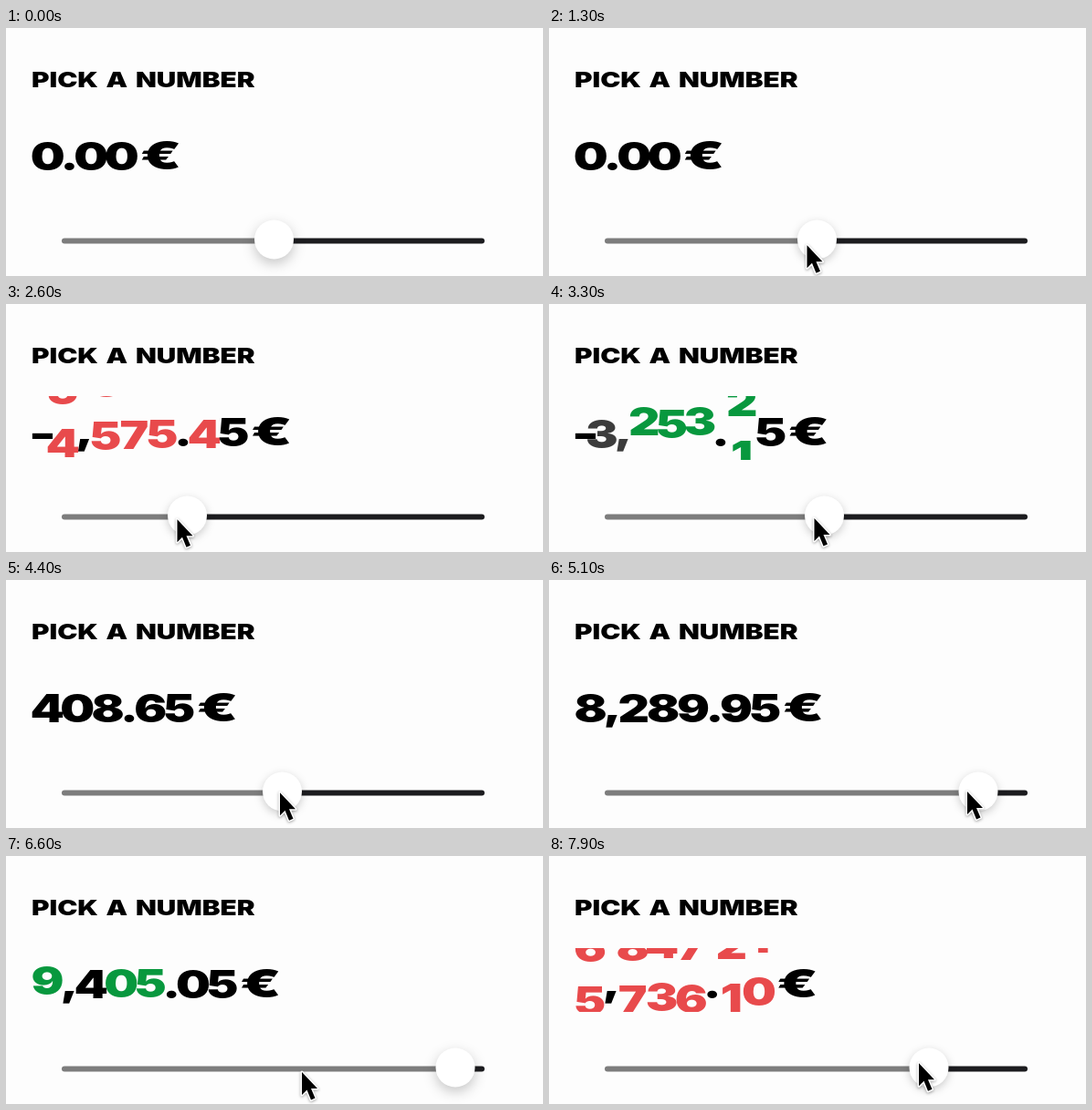
These frames come from a looping animation (588 px wide and 272 px high, 8000 ms). An HTML page:

```html
<!DOCTYPE html>
<html lang="en">
<head>
<meta charset="utf-8">
<title>Pick a number</title>
<style>
  html, body { margin: 0; width: 100%; height: 100%; overflow: hidden; background: #fdfdfd; }
  svg { display: block; width: 588px; height: 272px; }
  text { font: 900 42px Inter, "Open Sans", sans-serif; }
  .title { font-size: 23.4px; word-spacing: 2.2px; }
  #number text { text-anchor: middle; }
  .track { stroke-width: 6; stroke-linecap: round; }
  #cursor { filter: drop-shadow(0 1px 1.5px rgba(0,0,0,.35)); }
</style>
</head>
<body>
<svg viewBox="0 0 588 272">
  <clipPath id="window"><rect y="101" width="588" height="70"/></clipPath>
  <text class="title" transform="translate(28 65) scale(1.27 1)">PICK A NUMBER</text>
  <g id="number" clip-path="url(#window)"></g>
  <line id="rest" class="track" x2="521" y1="233.5" y2="233.5" stroke="#1c1c1f"/>
  <line id="fill" class="track" x1="64" y1="233.5" y2="233.5" stroke="#7d7d7d"/>
  <circle id="thumb" cy="232" r="21.5" fill="#fff"/>
  <path id="cursor" d="M1 2V27L6.5 21.5L11 32.5L15.5 30.5L11 20H18Z"
        stroke="#fff" stroke-width="3" stroke-linejoin="round" paint-order="stroke"/>
</svg>
<script>
const LOOP = 8000, STEP = 100, SPIN = 700;
const LEFT = 29, BASELINE = 155.5, ROW = 58, WIDE = 1.27, EXTRA_WIDE = 1.55;
const ADVANCE = [33.5, 23, 31.5, 32, 32.5, 31, 32.5, 30, 33, 33];
const RED = [232, 74, 76], GREEN = [8, 152, 62];

// start, value the wheels roll to
const readings = [
  [1300, -917.45], [1500, -2242.25], [2010, -4575.45], [3210, 408.65],
  [4400, 8289.95], [5350, 8490.05], [5950, 9405.05], [7400, 5736.10]
];

// start, end, thumb x, cursor x relative to the thumb
const drags = [
  [1300, 1900, 198.5, -12], [2900, 3300, 301.5, -12], [3800, 4200, 302.5, -3.5],
  [4400, 4800, 470, -13], [5300, 5700, 492, -12], [7400, 7900, 416, -12]
];

const $ = id => document.getElementById(id);
const clamp = v => Math.min(1, Math.max(0, v));
const mix = (a, b, k) => a + (b - a) * k;
const mixAll = (a, b, k) => a.map((v, i) => mix(v, b[i], k));
const wrap = d => ((d % 10) + 10) % 10;

function ease(t, from, to) {
  const k = clamp((t - from) / (to - from));
  return k * k * (3 - 2 * k);
}

const digitsOf = value => [...Math.abs(value * 100).toFixed(0).padStart(6, "0")].map(Number);
const isShown = (value, i) => i > 2 || Math.abs(value) >= 10 ** (3 - i);

// Distance a wheel rolls; short hops take one more full turn.
function turnOf(from, to, direction, changed) {
  const turn = wrap((to - from) * direction);
  return changed && turn < 2 ? turn + 10 : turn;
}

function spinWheel(wheel, i, before, after, u) {
  const was = digitsOf(before)[i], to = digitsOf(after)[i];
  const direction = after > Math.abs(before) ? 1 : -1;
  const left = (1 - u) ** (3 - 1 / (i + 1));
  const tinted = was !== to && isShown(before, i) && isShown(after, i);
  const strength = tinted ? clamp((1 - u) * 15) : 0;
  return {
    digit: wrap(to - direction * turnOf(wheel.digit, to, direction, was !== to) * left),
    shown: mix(+isShown(after, i), wheel.shown, left),
    advance: mix(ADVANCE[to], wheel.advance, 1 - u * u),
    colour: (after > before ? GREEN : RED).map(c => Math.round(c * strength))
  };
}

function poseAt(t) {
  let wheels = Array.from({ length: 6 }, (_, i) =>
    ({ digit: 0, shown: +isShown(0, i), advance: ADVANCE[0], colour: [0, 0, 0] }));
  let minus = 0, before = 0;
  readings.forEach(([start, after], n) => {
    if (t <= start) return;
    const end = n + 1 < readings.length ? readings[n + 1][0] : LOOP;
    const u = clamp((Math.min(t, end) - start) / SPIN);
    wheels = wheels.map((wheel, i) => spinWheel(wheel, i, before, after, u));
    minus = mix(+(after < 0), minus, (1 - u) ** 2);
    before = after;
  });
  return { wheels, minus };
}

function glyph(content = "") {
  const node = document.createElementNS("http://www.w3.org/2000/svg", "text");
  node.textContent = content;
  return $("number").appendChild(node);
}

function place(node, x, y, opacity = 1, wide = WIDE) {
  node.setAttribute("transform", `translate(${x.toFixed(2)} ${y.toFixed(2)}) scale(${wide} 1)`);
  node.setAttribute("opacity", opacity);
}

const sign = glyph("-"), comma = glyph(","), dot = glyph("."), euro = glyph("€");
const faces = Array.from({ length: 6 }, () => [glyph(), glyph()]);

function drawNumber(t) {
  const { wheels, minus } = poseAt(t);
  const room = shown => 1 - (1 - shown) ** 3;
  let x = LEFT + 17 * minus;
  place(sign, LEFT + 11, BASELINE + 1, clamp(minus * 2), EXTRA_WIDE);

  wheels.forEach(({ digit, shown, advance, colour }, i) => {
    const low = Math.floor(digit), part = digit - low;
    const width = advance * room(shown);
    faces[i].forEach((node, n) => {
      node.textContent = (low + n) % 10;
      node.setAttribute("fill", `rgb(${colour})`);
      place(node, x + width / 2, BASELINE + (part - n) * ROW, shown);
    });
    x += width;
    if (i === 0) {
      place(comma, x + 7.5, BASELINE - 3, shown);
      x += 15 * room(shown);
    }
    if (i === 3) {
      place(dot, x + 7, BASELINE);
      x += 14;
    }
  });
  place(euro, x + 26, BASELINE - 1, 1, EXTRA_WIDE);
}

function drawSlider(t) {
  const [x, grip] = drags.reduce(
    (at, [from, to, ...goal]) => mixAll(at, goal, ease(t, from, to)), [293.5, -12]);
  const away = ease(t, 6200, 6600) - ease(t, 7100, 7400);
  const below = 50 * (1 - ease(t, 800, 1100));
  const [cx, cy] = mixAll([x + grip, 238.5 - t / 600 + below], [323, 235], away);
  const held = t >= 1300 && away === 0;

  $("fill").setAttribute("x2", x);
  $("rest").setAttribute("x1", x);
  $("thumb").setAttribute("cx", x);
  $("thumb").style.filter = held
    ? "drop-shadow(0 3px 5px rgba(0,0,0,.2))"
    : "drop-shadow(0 5px 7px rgba(0,0,0,.22))";
  $("cursor").setAttribute("transform", `translate(${cx} ${cy})`);
}

const start = performance.now();
function frame(now) {
  const elapsed = Math.max(0, now - start) % LOOP;
  const t = Math.floor(elapsed / STEP) * STEP;
  drawNumber(t);
  drawSlider(t);
  requestAnimationFrame(frame);
}
frame(start);
</script>
</body>
</html>
```
